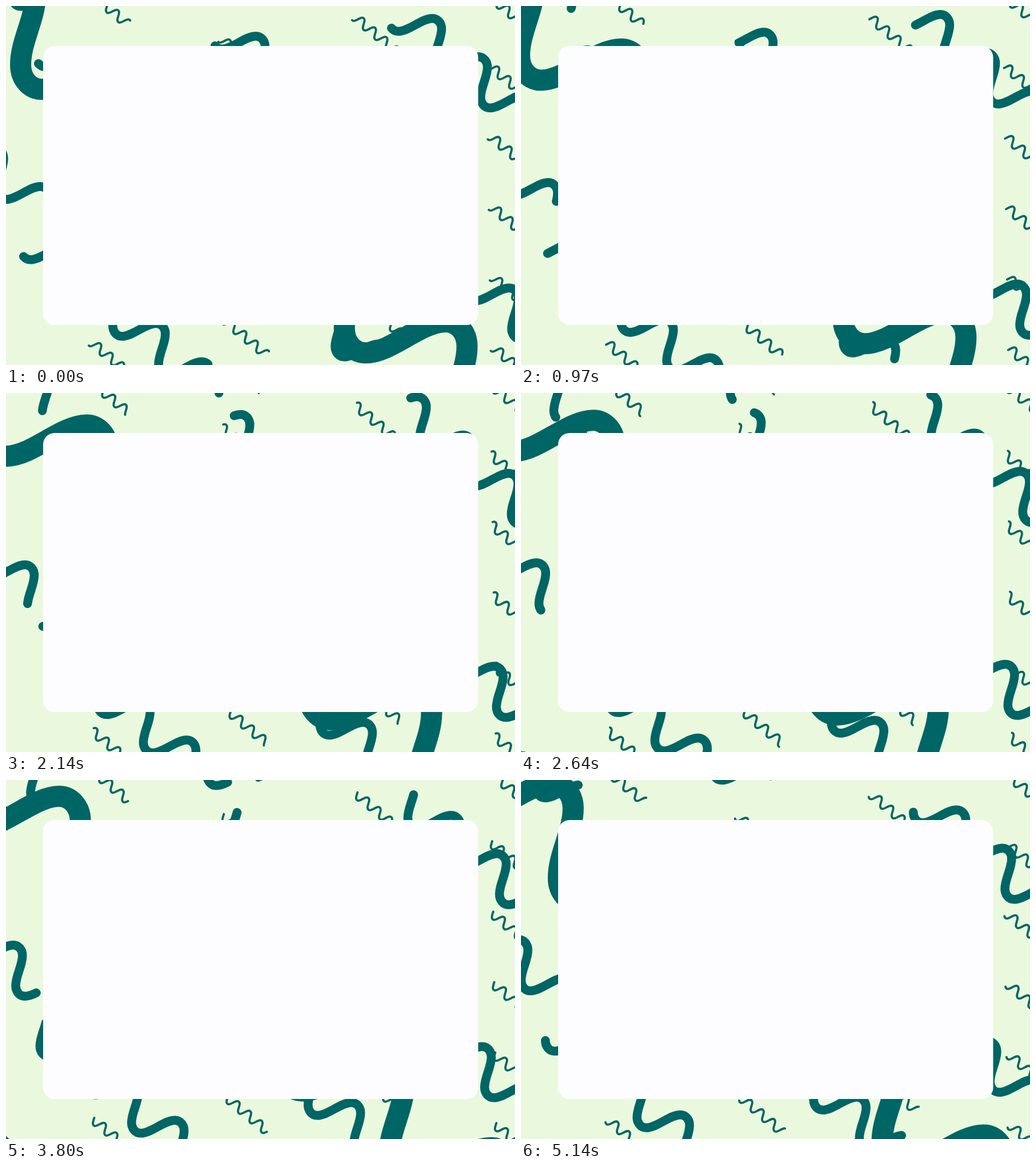
Write an HTML page with a canvas that moves like this. It is 891x628 px and loops after 5.17 s.

```html
<!DOCTYPE html>
<html lang="en">
<head>
<meta charset="utf-8">
<title>Wriggling squiggles</title>
<style>
  html, body { margin: 0; width: 100%; height: 100%; overflow: hidden; background: #eaf9dd; }
  canvas { display: block; }
</style>
</head>
<body>
<canvas id="stage" width="891" height="628"></canvas>
<script>
const ctx = document.getElementById('stage').getContext('2d');
const LOOP = 5170;
const PERIOD = [80.2, 67];     // offset from one wave to the next
const DRIFT = [-12.45, -7.1];  // wave movement per second, at scale 1
const CRAWL = 31;              // arc length per second along the wave
const HEAD = 13.5;             // arc length where a worm begins at time 0
const LENGTH = 609;

function buildWave(count) {
  const path = new Path2D();
  path.moveTo(-5.5, -14);
  for (let i = 0; i < count; i++) {
    const x = i * PERIOD[0], y = i * PERIOD[1];
    const curve = (a, b, c, d, e, f) =>
      path.bezierCurveTo(x + a, y + b, x + c, y + d, x + e, y + f);
    curve(-5.5, -3.5, 1.5, 4.3, 10.5, 4.3);
    curve(29.5, 4.3, 51.5, -18.3, 70.5, -18.3);
    curve(79.5, -18.3, 86.5, -10.5, 86.5, 0);
    curve(86.5, 18, PERIOD[0] - 5.5, PERIOD[1] - 32, PERIOD[0] - 5.5, PERIOD[1] - 14);
  }
  return path;
}

const wave = buildWave(7);

function worm(x, y, scale, width, t, { dashed = true, angle = 0 } = {}) {
  ctx.save();
  ctx.translate(x + DRIFT[0] * scale * t, y + DRIFT[1] * scale * t);
  ctx.rotate(angle);
  ctx.scale(scale, scale);
  ctx.lineWidth = width / scale;
  if (dashed) {
    ctx.setLineDash([LENGTH, 5000]);
    ctx.lineDashOffset = -(HEAD + CRAWL * t);
  }
  ctx.stroke(wave);
  ctx.restore();
}

// Worms repeat on a slanted grid spanned by u and v.
function grid(origin, u, v, rows, scale, width, t) {
  for (let i = -2; i <= 2; i++)
    for (let j = rows[0]; j <= rows[1]; j++)
      worm(origin[0] + i * u[0] + j * v[0], origin[1] + i * u[1] + j * v[1], scale, width, t);
}

function draw(now) {
  const t = now % LOOP / 1000;
  ctx.fillStyle = '#eaf9dd';
  ctx.fillRect(0, 0, 891, 628);
  ctx.strokeStyle = '#006565';
  ctx.lineCap = ctx.lineJoin = 'round';

  worm(-150, -17.5, 2.33, 37, t, { dashed: false, angle: -0.013 });
  grid([367, 71], [309, -31], [-26, 337.5], [-2, 2], 1, 15.5, t);
  grid([606, 25], [234, -38], [1.8, 123.3], [-2, 5], 0.25, 3.8, t);

  ctx.fillStyle = '#fdfdff';
  ctx.beginPath();
  ctx.roundRect(65, 70, 761.5, 488, 20);
  ctx.fill();
  requestAnimationFrame(() => draw(performance.now() - start));
}

const start = performance.now();
draw(0);
</script>
</body>
</html>
```
